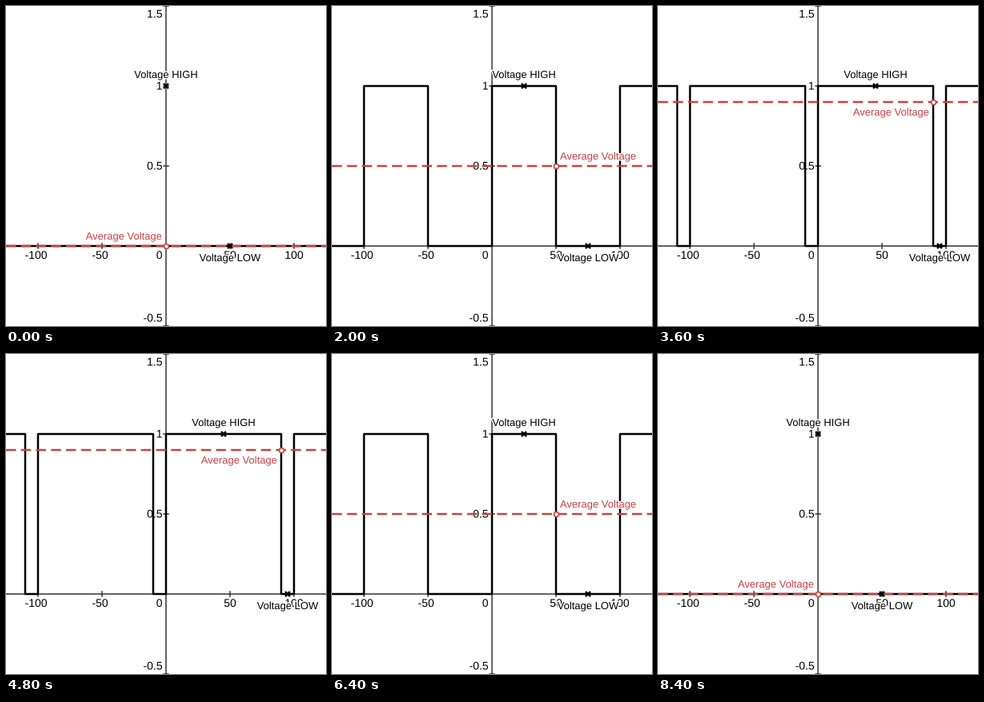
Recreate the animation shown at these times as a matplotlib script. Size 400 by 400 pixels, loop 8.8 s.

```python
import matplotlib.pyplot as plt
from matplotlib.animation import FuncAnimation
from matplotlib.patheffects import withStroke

SIZE, DPI = 400, 100
PX = 72 / DPI
FRAMES, STEP_MS = 22, 400
RED, BLACK, GREY = "#c74440", "#000000", "#333333"

plt.rcParams["font.family"] = "Liberation Sans"
fig = plt.figure(figsize=(SIZE / DPI, SIZE / DPI), dpi=DPI, facecolor="white")
ax = fig.add_axes([0, 0, 1, 1])
ax.set_xlim(0, SIZE)
ax.set_ylim(SIZE, 0)
ax.axis("off")


def sx(x):
    return 200 + 1.6 * x


def sy(y):
    return 300 - 200 * y


def line(xs, ys, color, width, z, **kw):
    return ax.plot(xs, ys, color=color, lw=width * PX, zorder=z, snap=False, **kw)[0]


def text(x, y, s, size, z, ha="center", color=BLACK):
    halo = [withStroke(linewidth=3 * PX, foreground="white")]
    return ax.text(x, y, s, fontsize=size * PX, ha=ha, va="baseline",
                   color=color, zorder=z, path_effects=halo)


def cross():
    return ax.plot([], [], "x", color=BLACK, ms=6 * PX, mew=2.5 * PX, zorder=6)[0]


# Axes, ticks and numbers
line([0, SIZE], [300, 300], GREY, 1.5, 1)
line([200, 200], [0, SIZE], GREY, 1.5, 1)
for v in (-100, -50, 50, 100):
    line([sx(v)] * 2, [297, 303], GREY, 1.5, 1)
    text(sx(v) - (2.5 if v < 0 else 0), 316, str(v), 14, 2)
text(195.5, 316, "0", 14, 2, "right")
for v in (-0.5, 0.5, 1, 1.5):
    line([197, 203], [sy(v)] * 2, GREY, 1.5, 1)
    base = min(max(sy(v) + 4.5, 14.5), 394.5)
    text(195.5, base, f"{v:g}", 14, 2, "right")

wave = line([], [], BLACK, 2.5, 3, solid_joinstyle="round")
mean = line([], [], RED, 2.5, 4, dashes=(5, 2.5), dash_capstyle="butt")
high, low = cross(), cross()
dot = ax.plot([], [], "o", ms=6 * PX, mfc="white", mec=RED, mew=1.7 * PX, zorder=7)[0]
high_text = text(0, 90, "Voltage HIGH", 13, 8)
low_text = text(0, 319, "Voltage LOW", 13, 8)
mean_text = text(0, 0, "Average Voltage", 13, 8, color=RED)


def square_wave(duty):
    if duty in (0, 100):
        return [0, SIZE], [sy(duty / 100)] * 2
    xs, ys = [], []
    for start in (-200, -100, 0, 100):
        a, b = sx(start), sx(start + duty)
        xs += [a, a, b, b]
        ys += [300, 100, 100, 300]
    return xs, ys


def update(i):
    duty = 10 * min(i, FRAMES - 1 - i)
    x, y = sx(duty), sy(duty / 100)
    wave.set_data(*square_wave(duty))
    mean.set_data([0, SIZE], [y, y])
    xh, xl = sx(duty / 2), sx((duty + 100) / 2)
    high.set_data([xh], [100])
    low.set_data([xl], [300])
    dot.set_data([x], [y])
    high_text.set_x(xh)
    low_text.set_x(xl)
    # The label goes right where there is room, and below near the top
    right = 0 < duty <= 60
    mean_text.set_ha("left" if right else "right")
    mean_text.set_position((x + 5 if right else x - 5, y + (17 if duty >= 90 else -8)))
    return wave, mean, high, low, dot, high_text, low_text, mean_text


anim = FuncAnimation(fig, update, frames=FRAMES, init_func=lambda: update(0),
                     interval=STEP_MS, repeat=True, repeat_delay=0, blit=False)
plt.show()
```
